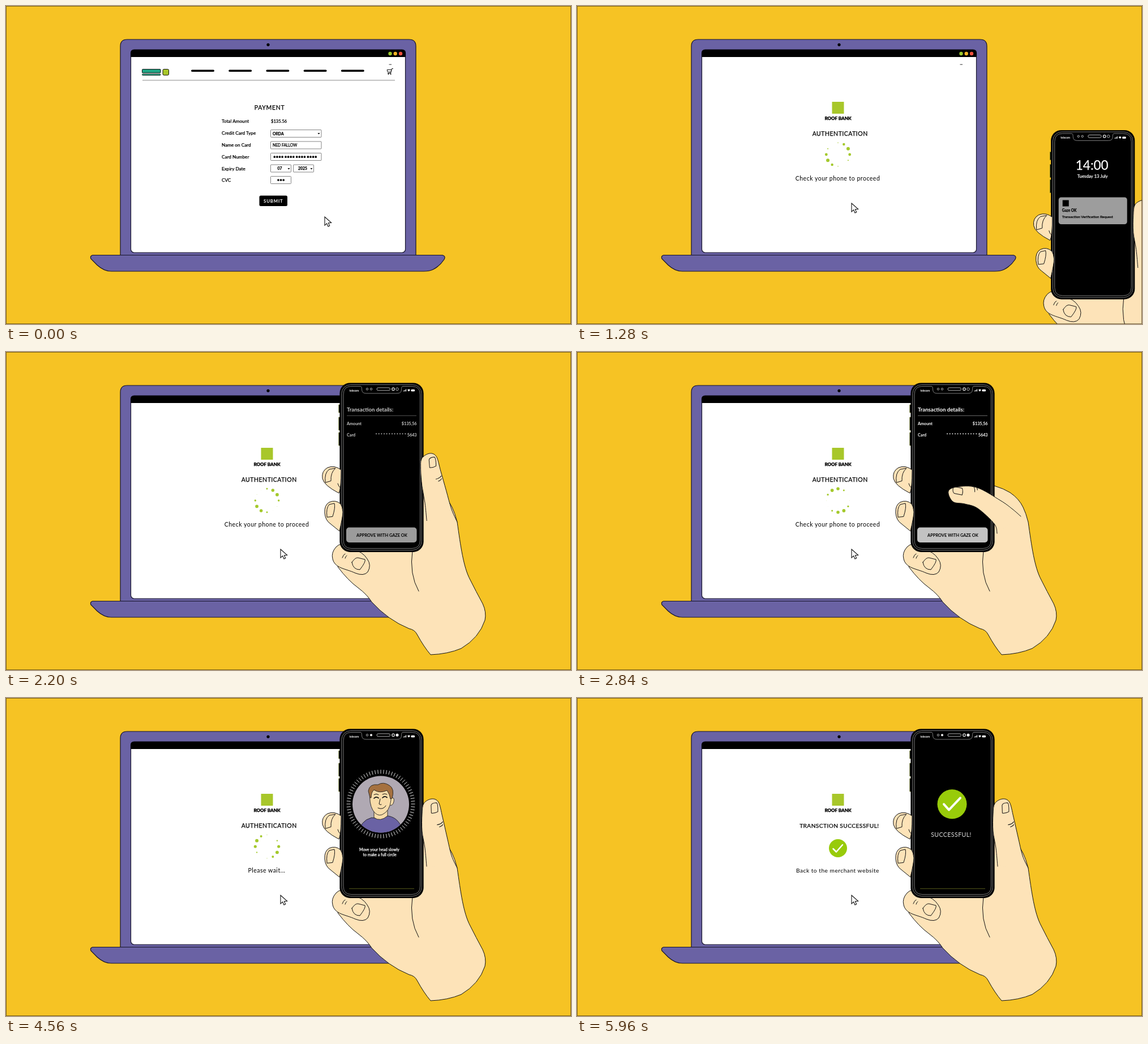
Recreate the animation shown at these times as an HTML page. Size 998 px wide and 561 px high, loop 6000 ms.

```html
<!DOCTYPE html>
<html lang="en">
<head>
<meta charset="utf-8">
<title>Card payment approval</title>
<style>
html, body { margin: 0; width: 100%; height: 100%; overflow: hidden; background: #f6c324; }
svg { display: block; width: 100%; height: 100%; }
text { font-family: Lato, "Open Sans", sans-serif; fill: currentColor; }
.line { fill: none; stroke: #111; stroke-width: 1; stroke-linecap: round; stroke-linejoin: round; }
.skin { fill: #fde3b8; stroke: #111; stroke-width: 1; stroke-linejoin: round; }
.box { fill: #fff; stroke: #666; stroke-width: .8; }
.mid { text-anchor: middle; }
.end { text-anchor: end; }
.med { stroke: currentColor; stroke-width: .25px; }
.bold { font-weight: 700; }
.title { font-size: 10.5px; letter-spacing: .5px; }
.tick { fill: none; stroke: #fff; stroke-linecap: round; stroke-linejoin: round; }
#screen { color: #fff; }
</style>
</head>
<body>
<svg viewBox="0 0 998 561">
  <defs><clipPath id="round"><circle cx="662" cy="187.500" r="50"/></clipPath></defs>
  <rect width="998" height="561" fill="#f6c324"/>

  <!-- laptop -->
  <g stroke="#15132a" stroke-width="1.200" fill="#6a62a4">
    <path d="M202 440V71Q202 59 214 59H712Q724 59 724 71V440Z"/>
    <path d="M153 439.500H771Q777 441 774 447Q766 459 754 465Q748 468 738 468H186Q173 468 161 457L150 446Q148 441 153 439.500Z"/>
    <rect x="220.500" y="77" width="485" height="358" rx="6" fill="#fff"/>
  </g>
  <path d="M220 90V83Q220 77 226 77H700Q706 77 706 83V90Z"/>
  <circle cx="463" cy="68.300" r="2.600"/>
  <circle cx="678.500" cy="84" r="3.200" fill="#9ac82c"/>
  <circle cx="687.700" cy="84" r="3.200" fill="#f5b524"/>
  <circle cx="697" cy="84" r="3.200" fill="#f0503c"/>
  <path d="M676.500 103.200h4.500" stroke="#333"/>

  <!-- shop page -->
  <g id="shop">
    <g stroke="#111">
      <rect x="240.500" y="111.500" width="32.500" height="6.500" rx="1" fill="#1fa584"/>
      <rect x="240.500" y="120" width="32.500" height="2.300" rx="1" fill="#1fa584" stroke-width=".8"/>
      <rect x="277" y="111.500" width="10.500" height="10.500" rx="2" fill="#a8c72a"/>
    </g>
    <path id="nav" stroke="#000" stroke-width="3.400" stroke-linecap="round"/>
    <path class="line" d="M683.500 110.500h-2l-2 8h-5M673.500 112.500h7.500l-1 4h-5.500z"/>
    <path d="M241 131H687" stroke="#888"/>
    <circle cx="675.500" cy="120" r="1.100"/><circle cx="679.500" cy="120" r="1.100"/>
    <text class="mid med" x="465.500" y="183" font-size="10.500" letter-spacing=".7">PAYMENT</text>
    <g class="med" font-size="8.200">
      <text x="381" y="206">Total Amount</text>
      <text x="381" y="227">Credit Card Type</text>
      <text x="381" y="248">Name on Card</text>
      <text x="381" y="269">Card Number</text>
      <text x="381" y="289.500">Expiry Date</text>
      <text x="381" y="310.300">CVC</text>
      <text x="468" y="206" font-size="7.600">$135.56</text>
    </g>
    <g class="box">
      <rect x="467.500" y="218.500" width="89.500" height="13" rx="1"/>
      <rect x="467.500" y="239" width="89.500" height="13" rx="1"/>
      <rect x="467.500" y="259.500" width="89.500" height="13" rx="1"/>
      <rect x="467.500" y="280" width="36" height="13" rx="1"/>
      <rect x="507.500" y="280" width="36" height="13" rx="1"/>
      <rect x="467.500" y="300.500" width="36" height="13" rx="1"/>
    </g>
    <g class="med" font-size="6.800">
      <text class="bold" x="471" y="227.500">ORDA</text>
      <text x="471" y="248">NED FALLOW</text>
      <text class="mid bold" x="483.500" y="289">07</text>
      <text class="mid bold" x="524" y="289">2025</text>
    </g>
    <path d="M550.500 224h4l-2 2.500zM497.500 286h4l-2 2.500zM537.500 286h4l-2 2.500z"/>
    <path id="digits" stroke="#000" stroke-width="3.700" stroke-linecap="round"/>
    <g id="submit">
      <rect x="447.500" y="334.500" width="49.500" height="18.500" rx="2.500"/>
      <text class="mid bold" x="472.300" y="346.500" font-size="7.800" letter-spacing=".8" color="#fff">SUBMIT</text>
    </g>
  </g>

  <!-- bank page -->
  <g id="bank">
    <rect x="450.500" y="169" width="21" height="21" fill="#a8c72a"/>
    <text class="mid med" x="461" y="201.300" font-size="8" font-weight="900">ROOF BANK</text>
    <g id="waiting">
      <text class="mid med title" x="464.700" y="229">AUTHENTICATION</text>
      <path id="spinner" fill="#a4c92c"/>
      <text id="hint" class="mid title" x="460.500" y="307.800"></text>
    </g>
    <g id="done">
      <text class="mid med title" x="463.300" y="229" style="font-size:10.200px;letter-spacing:.4px">TRANSCTION SUCCESSFUL!</text>
      <g class="pop" data-x="461" data-y="265">
        <circle r="16" fill="#98cb0a"/>
        <path class="tick check" pathLength="1" stroke-dasharray="1" d="M-8.500 1L-3 6.500L8 -6" stroke-width="2.500"/>
      </g>
      <text class="mid title" x="460.500" y="307.800" style="font-size:10.200px">Back to the merchant website</text>
    </g>
  </g>
  <path id="cursor" d="M0 0V15L3.600 11.700L6 17L8.700 15.800L6.400 10.700L11.600 10.400Z" fill="#fff" stroke="#111" stroke-width="1.100"/>

  <!-- hand and phone -->
  <g id="held">
    <path class="skin" d="M720 236H737Q754 241 765 248Q781 259 788 274Q793 284 797 300C803 342 808 380 820 402Q830 422 842 444Q849 459 846 473Q836 504 804 523Q780 533 750 534Q738 520 726 498Q722 490 712 488Q675 473 646 441Q638 428 622 416Q604 403 586 379L600 340Z"/>
    <path class="line" d="M718 350Q712 392 729 422"/>
    <path class="skin" d="M606 344Q592 334 583 344Q574 354 577 365C581 382 600 382 617 390Q632 396 639 388Q646 376 638 365Q630 352 612 348Z"/>
    <path class="line" d="M611 371Q617 362 622 363L634 366Q636 370 625 384Q613 384 611 371ZM594 363q2 -6 5 -7M599 364q1 -4 3 -5"/>

    <path d="M587.800 93h4v14h-4zM587.800 115h4v23h-4zM587.800 142h4v23h-4z" stroke="#6d7a1c" stroke-width=".7"/>
    <rect x="589.400" y="54.400" width="148.200" height="298.600" rx="18.500"/>
    <g fill="none" stroke="#999" stroke-width=".8">
      <rect x="592.800" y="57.600" width="141.400" height="292" rx="16"/>
      <path d="M626 60.500H610Q596 60.500 596 75V332Q596 346.500 610 346.500H717Q731.500 346.500 731.500 332V75Q731.500 60.500 717 60.500H701Q698.500 60.500 698.500 66Q698.500 73 691 73H636Q628.500 73 628.500 66Q628.500 60.500 626 60.500Z"/>
      <g stroke="#ddd">
        <rect x="655" y="63" width="23.500" height="4.800" rx="2.400"/>
        <circle cx="638" cy="65.400" r="1.700"/><circle cx="684" cy="65.400" r="2.200" stroke-width="1.300"/>
        <circle class="led" cx="645" cy="65.400" r="1.700"/><circle class="led" cx="691" cy="65.400" r="2.300"/>
      </g>
    </g>
    <g id="screen">
      <text class="bold" x="606.500" y="69.800" font-size="4.700">telecom</text>
      <path d="M702.500 69.500v-1.500M704.500 69.500v-2.500M706.500 69.500v-4" stroke="#fff" stroke-width="1.200"/>
      <path d="M709 66.700q2.500 -2 5 0l-2.500 3z" fill="#fff"/>
      <rect x="715.500" y="66" width="6.500" height="3.600" rx="1.300" fill="#fff"/>

      <g id="lock">
        <text class="mid med" x="662" y="125" font-size="22.500">14:00</text>
        <text class="mid med" x="663" y="139" font-size="7.800">Tuesday 13 July</text>
        <g id="notice" color="#000">
          <rect x="603" y="173" width="121" height="47.500" rx="4.500" fill="#bcbcbc"/>
          <rect x="610" y="178" width="11" height="11"/>
          <text class="bold med" x="609" y="199" font-size="6.500">Gaze OK</text>
          <text class="med" x="609" y="209.700" font-size="6.400">Transaction Verification Request</text>
        </g>
      </g>

      <g id="details">
        <text class="bold" x="602" y="105" font-size="9.600">Transaction details:</text>
        <path d="M602 112.300H725" stroke="#888" stroke-width=".8"/>
        <g class="bold" font-size="7.200">
          <text x="602" y="128.700">Amount</text>
          <text class="end" x="725.500" y="128.700">$135,56</text>
          <text x="602" y="148.700">Card</text>
          <text x="652.500" y="149" letter-spacing="1.600">************</text>
          <text class="end" x="725.500" y="148.700">5643</text>
        </g>
        <g color="#000">
          <rect id="approve" x="601" y="309.500" width="124.500" height="26.500" rx="5"/>
          <text class="mid bold" x="664" y="325.800" font-size="7.400">APPROVE WITH GAZE OK</text>
        </g>
      </g>

      <path id="home" d="M606 336.300H721" stroke="#6d7020" stroke-width=".8"/>

      <g id="scan">
        <path id="rays" stroke="#ddd" stroke-width="1"/>
        <circle cx="662" cy="187.500" r="50" fill="#b0a9b3"/>
        <g clip-path="url(#round)" stroke="#222" stroke-width=".9" stroke-linejoin="round">
          <path d="M622 242Q625 216 646 211Q660 214 675 208Q698 212 702 242Z" fill="#6a62a4"/>
          <path d="M650 196V211Q661 219 674 208V190Z" fill="#f8dca9"/>
          <path d="M679 176Q687 174 685 183Q683 191 677 189Z" fill="#f8dca9"/>
          <path d="M643 166Q641 186 648 198Q655 209 664 206Q678 200 680 180L679 160L648 158Z" fill="#f8dca9"/>
          <path d="M643 176Q641 168 640 164Q642 151 657 153Q666 147 677 154Q687 160 682 177L679 178Q678 170 673 163Q660 169 650 162Q645 166 645 176Z" fill="#a5713f"/>
        </g>
        <g class="line">
          <path d="M661 178L659 187Q661 189 663 188M657 194Q666 198 671 190M650 170.500q4 -2.500 8 0M665 170q4 -2.500 8 0" stroke-width="1"/>
          <path id="open" d="M654 176.800v1.400M668.500 176.300v1.400" stroke-width="2.400"/>
          <path id="shut" d="M650 177q4 -4 8 -.5M665 176q4 -4 8 -.5" stroke-width="1.700"/>
        </g>
        <text class="mid med" x="659.500" y="270.300" font-size="7">Move your head slowly</text>
        <text class="mid med" x="660" y="279.300" font-size="7">to make a full circle</text>
      </g>

      <g id="success">
        <g class="pop" data-x="662.500" data-y="187.300">
          <circle r="26" fill="#98cb0a"/>
          <path class="tick check" pathLength="1" stroke-dasharray="1" d="M-14.500 0L-5.500 10L14.500 -11" stroke-width="4"/>
        </g>
        <text id="word" class="mid" x="661" y="244.800" font-size="10.600" letter-spacing=".4" color="#ddd">SUCCESSFUL!</text>
      </g>
    </g>

    <path class="skin" d="M592 208Q580 199 568 204Q557 210 559 223Q561 235 588 249Q592 240 592 208Z"/>
    <path class="line" d="M564 230Q562 213 571 207L582 205Q573 213 574 227ZM591 240q-4 -3 -5 -8"/>
    <path class="skin" d="M591 268Q582 260 571 265Q562 270 563 284Q564 297 573 303L589 316Q595 290 595 282Q594 272 591 268Z"/>
    <path class="line" d="M567 291Q565 275 571 269L580 267Q582 275 577 290Z"/>
    <path id="thumbFill" fill="#fde3b8"/>
    <path id="thumbLine" class="line"/>
    <path id="nail" class="line" d="M-5.500 9V-5Q-4 -9 4 -9Q7 -8 6 7Q0 10 -5.500 9ZM4 30q7 -1 10 -5M8 34q4 -1 6 -4"/>
  </g>
  <rect x=".5" y=".5" width="997" height="560" fill="none" stroke="#3a2e08" stroke-opacity=".65"/>
</svg>
<script>
const LOOP = 6000, STEP = 40;
const el = id => document.getElementById(id);
const all = css => document.querySelectorAll(css);
const ramp = (t, a, b) => Math.min(1, Math.max(0, (t - a) / (b - a)));
const ease = x => x < .5 ? 4 * x ** 3 : 1 - (2 - 2 * x) ** 3 / 2;
const mix = (a, b, k) => a + (b - a) * k;
const move = (node, ...args) => node.setAttribute('transform', args.join(' '));
const fade = (id, value) => el(id).setAttribute('opacity', value);
const draw = (id, d) => el(id).setAttribute('d', d);
const range = n => [...Array(n).keys()];

// thumb outlines from resting beside the phone to reaching the button
const POSES = [
  [743,297, 740,265, 735,235, 735,205, 738,186, 752,178, 764,184, 771,210, 779,245, 787,278, 797,300],
  [744,300, 740,272, 734,242, 720,220, 715,200, 727,184, 741,187, 752,211, 770,240, 786,272, 797,300],
  [740,313, 735,296, 718,272, 703,251, 687,240, 688,222, 706,217, 732,231, 757,251, 774,271, 787,291],
  [742,320, 737,303, 708,276, 685,268, 664,264, 656,246, 671,238, 706,239, 748,262, 769,277, 784,290],
  [742,335, 735,325, 712,314, 688,312, 664,312, 653,298, 664,286, 700,275, 742,279, 766,286, 784,296]
];
const REACH = [[0, 0], [1480, 0], [1600, 1], [1740, 1.4], [1900, 1.4], [2240, 0], [2600, 0],
  [2840, 3], [2980, 4], [3200, 4], [3600, 2], [3960, 0], [LOOP, 0]];

function track(keys, t) {
  const i = keys.findIndex(k => k[0] > t);
  const [a, b] = [keys[i - 1], keys[i]];
  return mix(a[1], b[1], ramp(t, a[0], b[0]));
}

function smooth(p) {
  let d = 'M' + p[0];
  for (let i = 0; i < p.length - 1; i++) {
    const a = p[i - 1] || p[i], b = p[i], c = p[i + 1], e = p[i + 2] || c;
    d += 'C' + [0, 1].map(k => b[k] + (c[k] - a[k]) / 6) + ' ' +
      [0, 1].map(k => c[k] - (e[k] - b[k]) / 6) + ' ' + c;
  }
  return d;
}

function drawThumb(reach) {
  const i = Math.min(3, Math.floor(reach));
  const v = POSES[i].map((x, n) => mix(x, POSES[i + 1][n], reach - i));
  const p = range(11).map(n => [v[2 * n], v[2 * n + 1]]);
  const d = smooth(p), tip = p[5];
  draw('thumbFill', d + 'Z');
  draw('thumbLine', d);
  const dx = tip[0] - (p[3][0] + p[7][0]) / 2, dy = tip[1] - (p[3][1] + p[7][1]) / 2;
  const angle = Math.atan2(dx, -dy) * 180 / Math.PI;
  move(el('nail'), `translate(${tip})`, `rotate(${angle})`, 'translate(4 16)');
}

// two opposite bulges travel round a ring of twelve dots
function drawSpinner(t) {
  draw('spinner', range(12).map(i => {
    const a = i * Math.PI / 6, lobe = (.18 * t + 12) * Math.PI / 180;
    const r = 3 * Math.abs(Math.cos(a - lobe)) ** 1.8;
    const x = 461 + 20.7 * Math.sin(a), y = 262 - 20.7 * Math.cos(a);
    return `M${x - r} ${y}a${r} ${r} 0 1 0 ${2 * r} 0a${r} ${r} 0 1 0 ${-2 * r} 0`;
  }).join(''));
}

function render(t) {
  const go = ease(ramp(t, 40, 560));
  move(el('cursor'), `translate(${mix(563, 485, go)} ${mix(372, 348, go)})`);
  const press = t >= 560 && t < 680 ? .93 : 1;
  move(el('submit'), 'translate(472.3 343.8)', `scale(${press})`, 'translate(-472.3 -343.8)');
  fade('shop', 1 - ramp(t, 680, 760));
  fade('bank', ramp(t, 720, 840));

  const away = 449 * (1 - ease(ramp(t, 1010, 1570)));
  move(el('held'), `translate(${away} ${away * .664})`);
  drawThumb(track(REACH, t));
  drawSpinner(t);

  const finished = t >= 5400;
  el('hint').textContent = t < 3720 ? 'Check your phone to proceed' : 'Please wait...';
  fade('waiting', +!finished);
  fade('done', +finished);

  fade('lock', 1 - ramp(t, 1960, 2080));
  fade('notice', (.84 + .16 * ramp(t, 1280, 1600)) * (t >= 1800 && t < 1920 ? .75 : 1));
  fade('details', ramp(t, 2040, 2240) - ramp(t, 3280, 3440));
  el('approve').setAttribute('fill', t >= 3000 && t < 3160 ? '#8c8c8c' : '#c2c2c2');
  fade('home', +(t >= 3440));
  fade('scan', ramp(t, 3540, 3920) - ramp(t, 5280, 5440));
  all('.led').forEach(n => n.setAttribute('fill', t >= 3680 ? '#fff' : 'none'));
  const blink = t >= 4520 && t < 4680;
  fade('open', +!blink);
  fade('shut', +blink);

  fade('success', +finished);
  fade('word', ramp(t, 5640, 5920));
  const size = 1 - (1 - ramp(t, 5520, 5840)) ** 3;
  all('.pop').forEach(n => move(n, `translate(${n.dataset.x} ${n.dataset.y})`, `scale(${size})`));
  const left = 1 - ramp(t, 5680, 5920);
  all('.check').forEach(n => {
    n.setAttribute('stroke-dashoffset', left);
    n.setAttribute('opacity', +(left < 1));
  });
}

draw('nav', range(5).map(i => `M${328.7 + 66.2 * i} 114.3h37.6`).join(''));
draw('digits', range(16).map(i => `M${474.3 + 4.6 * i + 1.3 * (i >> 2)} 266.2h.01`).join('') +
  range(3).map(i => `M${481 + 4.6 * i} 307h.01`).join(''));
draw('rays', range(72).map(i => {
  const a = i * Math.PI / 36, at = r => `${662 + r * Math.sin(a)} ${187 - r * Math.cos(a)}`;
  return `M${at(53.5)}L${at(60.5)}`;
}).join(''));

const start = performance.now();
function frame() {
  const t = (performance.now() - start) % LOOP;
  render(Math.floor(t / STEP) * STEP);
  requestAnimationFrame(frame);
}
frame();
</script>
</body>
</html>
```
